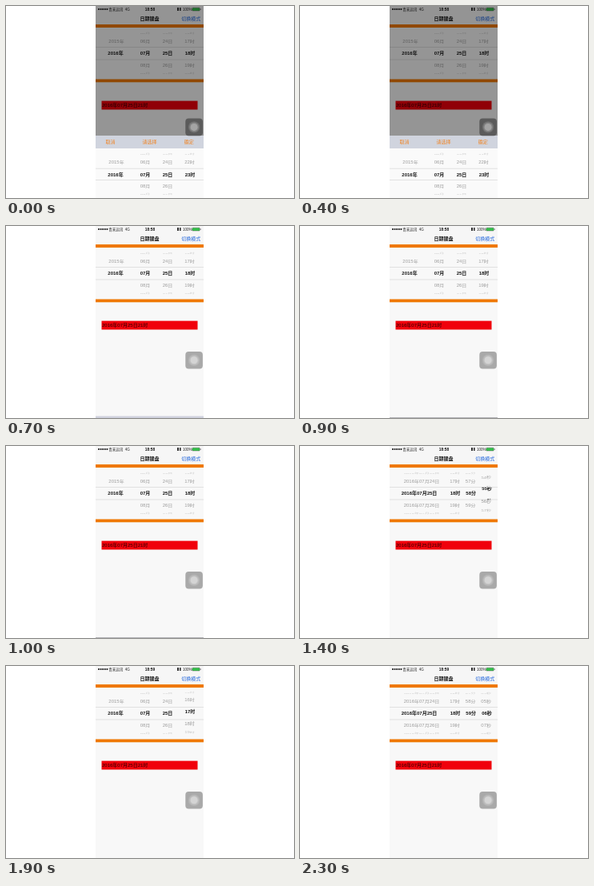
Animation, 360 px wide and 240 px high, one loop 2.4 s. Source, as an HTML page:

```html
<!DOCTYPE html>
<html lang="zh-CN">
<head>
<meta charset="utf-8">
<title>日期键盘</title>
<style>
  html, body { margin: 0; width: 100%; height: 100%; overflow: hidden; background: #fff; }
  svg { display: block; }
  text {
    font-family: "Liberation Sans", "Noto Sans CJK SC", "Noto Sans CJK", sans-serif;
    font-size: 6px;
  }
</style>
</head>
<body>
<svg id="stage" width="360" height="240" viewBox="0 0 360 240"></svg>
<script>
const stage = document.getElementById('stage');
const LOOP = 2400, STEP = 100;
const LEFT = 112, WIDTH = 135;
const PITCH = 33.6 * Math.PI / 180, RADIUS = 27.1;

// Wheel positions over time: [ms, value]
const SHEET_HOUR = [[0, 23], [400, 23], [500, 22.4], [600, 22]];
const SECOND = [[1200, 53], [1300, 54.2], [1400, 55.4], [1500, 55.8], [1600, 56]];
const HOUR = [[1700, 18], [1800, 17.5], [1900, 17.15], [2000, 17]];

function valueAt(keys, t) {
  if (t <= keys[0][0]) return keys[0][1];
  for (let i = 1; i < keys.length; i++) {
    const [t0, a] = keys[i - 1], [t1, b] = keys[i];
    if (t <= t1) return a + (b - a) * (t - t0) / (t1 - t0);
  }
  return keys[keys.length - 1][1];
}

const rect = (x, y, w, h, fill, more = '') =>
  `<rect x="${x}" y="${y}" width="${w}" height="${h}" fill="${fill}" ${more}/>`;
const circle = (x, y, r, fill) => `<circle cx="${x}" cy="${y}" r="${r}" fill="${fill}"/>`;
const label = (x, y, s, fill, more = '') => `<text x="${x}" y="${y}" fill="${fill}" ${more}>${s}</text>`;
const middle = 'text-anchor="middle"';
const pad = n => String(n).padStart(2, '0');

const column = (x, unit, value, min, max, shift = 0) =>
  ({ x, value, min, max, shift, text: n => pad(n) + unit });

function wheelRows(col, cy, selected) {
  let out = '';
  const base = Math.round(col.value);
  for (let n = base - 3; n <= base + 3; n++) {
    const angle = (n - col.value) * PITCH, squash = Math.cos(angle);
    if (n < col.min || n > col.max || squash < 0.2) continue;
    const y = cy + RADIUS * Math.sin(angle);
    const x = col.x + (selected ? 0 : col.shift);
    const style = selected ? 'font-weight="bold"' : `opacity="${Math.min(1, squash + 0.1)}"`;
    out += `<g transform="translate(${x} ${y}) scale(1 ${squash})">` +
      label(0, 2.2, col.text(n), selected ? '#181818' : '#959595', middle + ' ' + style) + '</g>';
  }
  return out;
}

function picker(cy, half, cols, bg) {
  const top = cy - half, h = half * 2;
  const rows = selected => cols.map(c => wheelRows(c, cy, selected)).join('');
  return rows(false) + rect(LEFT, top, WIDTH, h, bg) +
    `<svg x="${LEFT}" y="${top}" width="${WIDTH}" height="${h}" viewBox="${LEFT} ${top} ${WIDTH} ${h}">` +
    rows(true) + '</svg>' +
    rect(LEFT, top - 0.25, WIDTH, 0.5, '#c8c8c8') + rect(LEFT, top + h - 0.25, WIDTH, 0.5, '#c8c8c8');
}

const hourColumns = hour => [
  column(137, '年', 2016, 2015, 2016, 1),
  column(174, '月', 7, 1, 12),
  column(202, '日', 25, 1, 31),
  column(230, '时', hour, 0, 23, -0.5)
];

const secondColumns = (minute, second) => [
  { ...column(149, '日', 25, 1, 31, 3), text: n => `2016年07月${pad(n)}日` },
  column(194, '时', 18, 0, 23, -0.5),
  column(213.7, '分', minute, 0, 59, -0.5),
  column(233.5, '秒', second, 0, 59, -0.8)
];

function header(t) {
  let out = rect(LEFT, 0, WIDTH, 23, '#f6f6f6');
  for (let i = 0; i < 5; i++) out += circle(116 + i * 2.6, 4, 1.05, '#111');
  const small = 'style="font-size:4.5px"';
  return out +
    label(128.2, 5.7, '青禾远讯', '#222', small) +
    label(148.8, 5.7, '4G', '#222', small) +
    label(180, 5.8, t < 1700 ? '18:58' : '18:59', '#111', middle + ' font-weight="bold" style="font-size:4.8px"') +
    rect(214, 2, 2, 4, '#333') + rect(217, 2, 1.6, 4, '#333') +
    label(221, 5.7, '100%', '#222', small) +
    rect(232.8, 2.2, 9.4, 3.8, '#35c24a', 'rx="0.7" stroke="#444" stroke-width="0.4"') +
    rect(242.8, 3.3, 0.7, 1.6, '#444') +
    label(179.6, 17.8, '日期键盘', '#111', middle + ' font-weight="bold"') +
    label(231.3, 17.8, '切换模式', '#1c62dc', middle);
}

function mainPicker(t) {
  let cols;
  if (t < 1200) cols = hourColumns(18);
  else if (t < 1700) cols = secondColumns(58, valueAt(SECOND, t));
  else if (t < 2200) cols = hourColumns(valueAt(HOUR, t));
  else cols = secondColumns(59, 6);
  return picker(59.2, 7.8, cols, '#f8f8f8');
}

function touchButton(y, dim) {
  const [box, outer, ring, core] = dim
    ? ['#5b5b5b', '#707070', '#858585', '#a4a4a4']
    : ['#a9a9a9', '#b5b5b5', '#c1c1c1', '#d4d4d4'];
  return rect(224.3, y - 10.8, 21.6, 21.6, box, 'rx="4"') +
    circle(235.1, y, 7.2, outer) + circle(235.1, y, 5.8, ring) + circle(235.1, y, 4.5, core);
}

function sheet(t) {
  const orange = '#f08424';
  return rect(LEFT, 162, WIDTH, 78, '#fafafa') + rect(LEFT, 162, WIDTH, 16, '#d0d4de') +
    label(130.5, 172.2, '取消', orange, middle) +
    label(179.5, 172.2, '请选择', orange, middle) +
    label(228.7, 172.2, '确定', orange, middle) +
    picker(210.4, 7.3, hourColumns(valueAt(SHEET_HOUR, t)), '#fafafa');
}

function draw(t) {
  const open = t < 700;
  let out = rect(LEFT, 0, WIDTH, 240, '#f8f8f8') + header(t) + mainPicker(t) +
    rect(LEFT, 23, WIDTH, 4, '#ef7800') + rect(LEFT, 91.5, WIDTH, 3.8, '#ef7800') +
    rect(119.5, 118.6, 120, 10.9, '#f0000c') +
    label(120, 126.3, '2016年07月25日21时', '#200');
  if (open) out += rect(LEFT, 0, WIDTH, 162, '#000', 'opacity="0.4"') + sheet(t);
  else if (t < 1200) {
    const top = t < 800 ? 237.6 : t < 900 ? 238.6 : 239;
    out += rect(LEFT, top, WIDTH, 240 - top, t < 900 ? '#d0d2de' : '#b4b4b8');
  }
  stage.innerHTML = out + touchButton(open ? 151.4 : 167.8, open);
}

const start = performance.now();
let shown = -1;
function tick() {
  const t = Math.floor((performance.now() - start) % LOOP / STEP) * STEP;
  if (t !== shown) draw(shown = t);
  requestAnimationFrame(tick);
}
tick();
</script>
</body>
</html>
```
